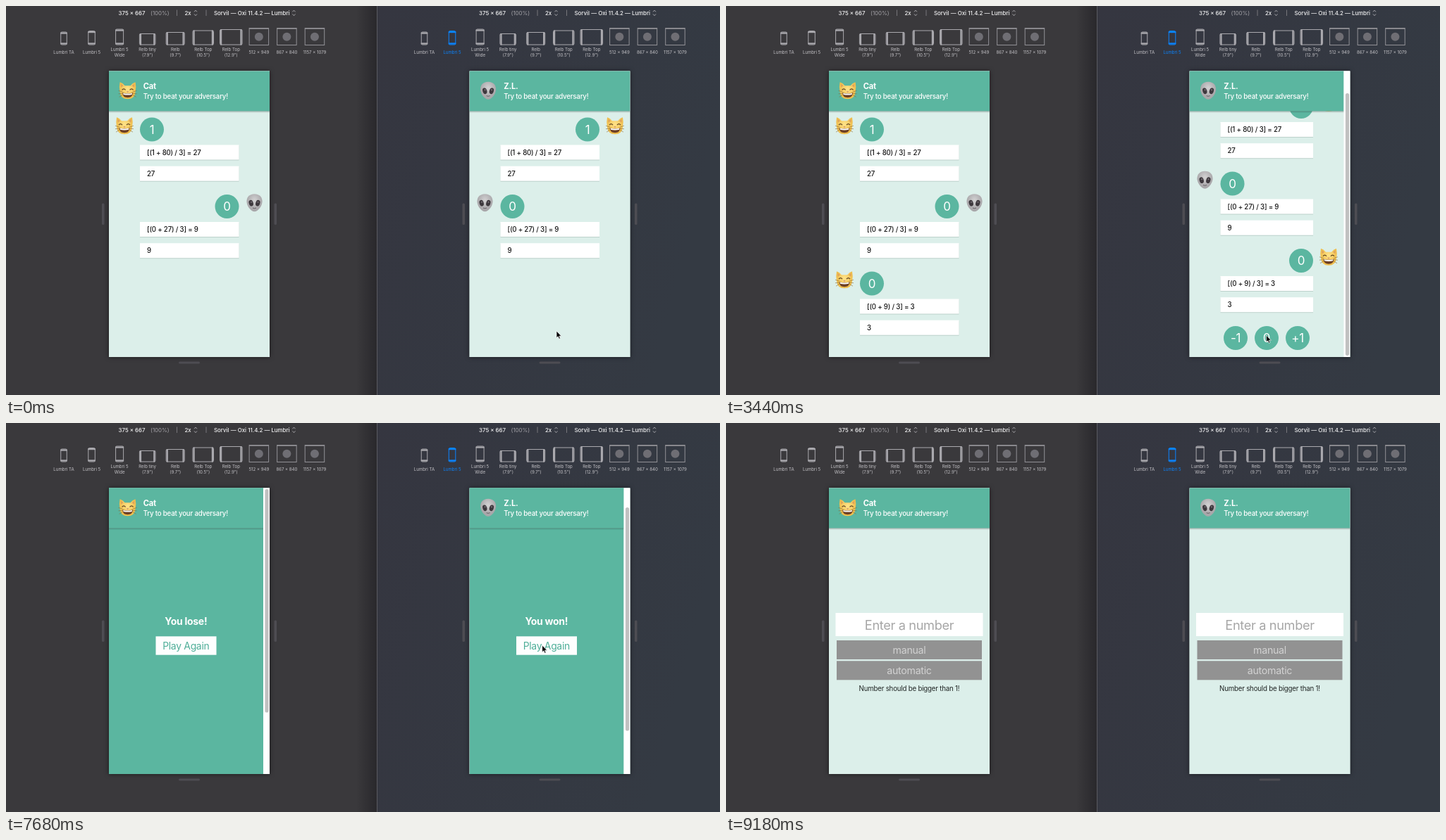
Animation of 1013 by 553 pixels, one loop 9630 ms. Source, as an HTML page:

```html
<!DOCTYPE html>
<html lang="en">
<head>
<meta charset="utf-8">
<title>Turn game on two phones</title>
<style>
html, body { margin: 0; width: 100%; height: 100%; overflow: hidden; background: #3a393c; }
#stage { display: block; width: 1013px; height: 553px; }
text { font-family: Inter, "Open Sans", sans-serif; white-space: pre; }
.app text { letter-spacing: -.02em; }
.frame { filter: drop-shadow(0 0 3px rgba(0, 0, 0, .55)); }
</style>
</head>
<body>
<svg id="stage" viewBox="0 0 1013 553" xmlns="http://www.w3.org/2000/svg">
  <defs>
    <linearGradient id="edge"><stop offset="0" stop-color="#232226" stop-opacity="0"/><stop offset="1" stop-color="#232226" stop-opacity=".75"/></linearGradient>
    <linearGradient id="pane" x2="1" y2=".3"><stop offset="0" stop-color="#353640"/><stop offset="1" stop-color="#343a43"/></linearGradient>
    <radialGradient id="fur" cy=".4"><stop offset="0" stop-color="#ffe48a"/><stop offset="1" stop-color="#efbe4d"/></radialGradient>
    <radialGradient id="skin" cy=".35"><stop offset="0" stop-color="#d3d2d3"/><stop offset="1" stop-color="#a9a7aa"/></radialGradient>
    <g id="cat">
      <path d="M-11 -12 Q-7 -11 -4 -7 H4 Q7 -11 11 -12 Q12.5 -5 11 2 Q10 12 0 12 Q-10 12 -11 2 Q-12.500 -5 -11 -12Z" fill="url(#fur)"/>
      <path d="M-9.500 -9.500 L-9.500 -4.500 L-6 -7Z M9.500 -9.500 L9.500 -4.500 L6 -7Z" fill="#dfa25c"/>
      <path d="M-8 -1 Q-5.500 -4 -3 -1 M8 -1 Q5.500 -4 3 -1" fill="none" stroke="#5b4020" stroke-width="1.200"/>
      <path d="M-7.500 3 Q0 5 7.500 3 Q7 10 0 10 Q-7 10 -7.500 3Z" fill="#6d3f24"/>
      <path d="M-6.500 3.600 Q0 5 6.500 3.600 L6 5.600 Q0 6.800 -6 5.600Z" fill="#fff"/>
      <path d="M-1.500 1 H1.500 L0 2.800Z" fill="#c98274"/>
      <path d="M-7 2 L-13 0 M-7 4 L-13 4.500 M-7 6 L-12 9 M7 2 L13 0 M7 4 L13 4.500 M7 6 L12 9" stroke="#8b6a35" stroke-width=".6"/>
    </g>
    <g id="alien">
      <path d="M0 -12.500 C7.500 -12.500 11.500 -7.500 11 -1 C10.500 5 5 12.500 0 12.500 C-5 12.500 -10.500 5 -11 -1 C-11.500 -7.500 -7.500 -12.500 0 -12.500Z" fill="url(#skin)"/>
      <ellipse cx="-4.800" cy=".5" rx="3" ry="4.400" transform="rotate(-18 -4.800 .5)" fill="#3d383d"/>
      <ellipse cx="4.800" cy=".5" rx="3" ry="4.400" transform="rotate(18 4.800 .5)" fill="#3d383d"/>
      <circle cx="-4.500" cy="-1" r="1" fill="#817a80"/><circle cx="5" cy="-1" r="1" fill="#817a80"/>
      <path d="M-2.500 7.300 Q0 8.800 2.500 7.300" fill="none" stroke="#5b575b" stroke-width=".9"/>
    </g>
  </defs>
  <rect width="1013" height="553" fill="#3a393c"/>
  <rect x="497" width="30" height="553" fill="url(#edge)"/>
  <rect x="526" width="487" height="553" fill="url(#pane)"/>
  <rect x="526" width="1" height="553" fill="#5a5a60"/>
  <g id="chrome"></g>
  <g id="left" class="app"></g>
  <g id="right" class="app" transform="translate(511.5)"></g>
  <g id="pointer">
    <path d="M0 0 V9.800 L2.200 7.800 L3.700 11.300 L5.400 10.600 L3.900 7.200 H6.900Z" fill="#000" stroke="#fff" stroke-width=".7"/>
    <g id="denied" fill="#e4e6e5" stroke="#858887"><circle cx="5.500" cy="14.800" r="4.700"/><path d="M2.500 11.800 L8.500 17.800"/></g>
  </g>
</svg>
<script>
const LOOP = 9630, SHIFT = 511.5;
const GREEN = '#5bb6a0', MINT = '#dcefea';
const $ = id => document.getElementById(id);

const rect = (x, y, w, h, fill, extra = '') =>
  `<rect x="${x}" y="${y}" width="${w}" height="${h}" fill="${fill}" ${extra}/>`;
const text = (x, y, size, fill, str, extra = '') =>
  `<text x="${x}" y="${y}" font-size="${size}" fill="${fill}" ${extra}>${str}</text>`;
const mid = (x, y, size, fill, str, extra = '') =>
  text(x, y, size, fill, str, 'text-anchor="middle" ' + extra);
const icon = (name, x, y) => `<use href="#${name}" x="${x}" y="${y}"/>`;

// Toolbar: width, top, kind, label lines
const devices = [
  [9.5, 36.5, 'phone', 'Lumbri TA'],
  [10.5, 35, 'phone', 'Lumbri 5'],
  [12, 32.5, 'phone', 'Lumbri 5', 'Wide'],
  [23.5, 39, 'tablet', 'Relb tiny', '(7.9")'],
  [27, 37, 'tablet', 'Relb', '(9.7")'],
  [30.5, 34.5, 'tablet', 'Relb Top', '(10.5")'],
  [32.5, 33, 'tablet', 'Relb Top', '(12.9")'],
  [27.5, 31.5, 'window', '512 × 949'],
  [27.5, 31.5, 'window', '867 × 840'],
  [27.5, 31.5, 'window', '1157 × 1079']
];

function device([w, top, kind, ...lines], i, active) {
  const cx = 82 + i * 39.55, x = cx - w / 2, h = 55.5 - top;
  const tone = active ? '#0a84ff' : '#aaa9ae';
  const line = `stroke="${tone}" rx="1.5"`;
  let out = '';
  if (kind === 'window') {
    out += rect(x, top, w, h, 'none', 'stroke="#929196"') + rect(x, top, w, 1.3, '#929196') +
      `<circle cx="${cx}" cy="43.7" r="6" fill="#6f6e74"/>`;
  } else {
    out += rect(x + .5, top + .5, w - 1, h - 1, 'none', line);
    out += kind === 'phone'
      ? rect(x, top + 1, w, 2.2, tone) + rect(x, 52.3, w, 2.2, tone)
      : rect(x + 1, top, 2.2, h, tone) + rect(x + w - 3.2, top, 2.2, h, tone);
  }
  const base = lines.length > 1 ? 64.2 : 68.2;
  return out + lines.map((s, n) => mid(cx, base + n * 8, 6.1, active ? tone : '#c4c3c7', s)).join('');
}

function chrome(active) {
  const arrows = x => `<path d="M${x - 2} 8.300 l2 -2.200 l2 2.200 M${x - 2} 11.500 l2 2.200 l2 -2.200" fill="none" stroke="#b5b4b8" stroke-width=".9"/>`;
  const label = (x, s) => text(x, 12.8, 7.9, '#f2f2f3', s, 'font-weight="500"');
  const grip = (x, y, w, h) => rect(x, y, w, h, '#4e4d53', 'rx="1.5"');
  return label(159.5, '375 × 667') + text(205, 12.8, 7.9, '#a3a2a7', '(100%)') +
    rect(242, 5.5, 1, 8.5, '#77767b') + label(253.5, '2x') + arrows(269) +
    rect(283.5, 5.5, 1, 8.5, '#77767b') + label(295, 'Sorvil — Oxi 11.4.2 — Lumbri') + arrows(408.5) +
    devices.map((d, i) => device(d, i, i === active)).join('') +
    grip(136, 280.5, 3.5, 30.5) + grip(380.5, 280.5, 3.5, 30.5) + grip(245, 505.5, 30, 3) +
    rect(146, 92.5, 228, 406.5, MINT, 'class="frame"');
}

// One turn: avatar, choice, sum and result
function turn({ who, pick, sum, result }, i, onRight, w) {
  const y = 175.5 + i * 109.5, end = 102.5 + w;
  const cx = onRight ? end - 17 : 207;
  const card = (top, s) => rect(190, top + 1, end - 190, 21, '#bdd2cc') +
    rect(190, top, end - 190, 21, '#fff') + text(200, top + 14, 9.7, '#151515', s, 'font-weight="500"');
  return icon(who, onRight ? cx + 39 : 168, y - 5.3) + button(cx, y, pick) +
    card(y + 22, sum) + card(y + 52.2, result);
}

const button = (x, y, s) => `<circle cx="${x}" cy="${y}" r="17" fill="${GREEN}"/>` + mid(x, y + 6.1, 17, '#fff', s);

const turns = [
  { who: 'cat', pick: 1, sum: '[(1 + 80) / 3] = 27', result: 27 },
  { who: 'alien', pick: 0, sum: '[(0 + 27) / 3] = 9', result: 9 },
  { who: 'cat', pick: 0, sum: '[(0 + 9) / 3] = 3', result: 3 }
];

function chat(s, w) {
  const rows = turns.slice(0, s.count).map((r, i) => turn(r, i, r.who !== s.near, w)).join('');
  const c = 146 + w / 2;
  const keys = s.keys ? ['-1', '0', '+1'].map((k, i) => button(c + (i - 1) * 44, 504.5, k)).join('') : '';
  return `<g transform="translate(0 ${-s.scroll})">${rows}${keys}</g>`;
}

const ending = s => rect(146, 92, 219, 408, GREEN) +
  mid(255.3, 286.6, 14, '#fff', s.verdict, 'font-weight="700"') +
  rect(212.5, 303.3, 86, 26.4, '#fdfefe') + mid(255.3, 322, 13.9, '#4eae98', 'Play Again');

const form = () => rect(155.5, 270, 209, 33, '#fff') + mid(260, 293.8, 18.2, '#a6a6a6', 'Enter a number') +
  rect(157, 309, 206, 27, '#929292') + mid(260, 328, 14.2, '#d2d2d2', 'manual') +
  rect(157, 338.3, 206, 27, '#929292') + mid(260, 357.3, 14.2, '#d2d2d2', 'automatic') +
  mid(260, 380.5, 9.7, '#202524', 'Number should be bigger than 1!');

const views = { chat, ending, form, blank: () => '' };

function phone(s) {
  const w = s.bar ? 219 : 228;
  const head = rect(146, 149.5, w, 2, '#000', 'opacity=".1"') + rect(146, 149.2, w, 1, '#555', 'opacity=".4"') +
    rect(146, 92, w, 57.4, GREEN) + icon(s.self, 172.6, 120.3) +
    text(194.7, 118, 11.2, '#fff', s.self === 'cat' ? 'Cat' : 'Z.L.', 'font-weight="700"') +
    text(194.7, 132.2, 9.7, '#fff', 'Try to beat your adversary!', 'font-weight="500"');
  const bar = s.bar ? rect(365, 92, 9, 408, '#fff') +
    rect(367.4, s.bar[0], 5.2, s.bar[1], '#c1c1c1', 'rx="2.6"') : '';
  return `<svg x="146" y="92.5" width="228" height="406.5" viewBox="146 92.5 228 406.5">` +
    rect(146, 92, 228, 408, MINT) + views[s.view](s, w) + head + bar + '</svg>';
}

function scene(t) {
  const left = { self: 'cat', near: 'cat' }, right = { self: 'alien', near: 'alien' };
  if (t < 3590) {
    const third = t >= 450;
    const scroll = t < 1520 ? 0 : t < 1670 ? 18 : 32.5;
    Object.assign(left, { view: 'chat', count: third ? 3 : 2, scroll: 0 });
    Object.assign(right, { view: 'chat', count: left.count, scroll, keys: third,
      bar: third && [94 + scroll * .92, 373] });
  } else if (t < 7900) {
    Object.assign(left, { view: 'ending', verdict: 'You lose!', bar: [94, 317.5] });
    Object.assign(right, { view: 'ending', verdict: 'You won!', bar: [120, 317.5] });
  } else {
    left.view = right.view = t > 8100 && t < 8250 ? 'blank' : 'form';
    if (left.view === 'blank') left.self = 'alien';
  }
  return [left, right];
}

const bursts = [[150, 1070, 7], [1220, 1220, 1], [1520, 1670, 2], [2420, 3440, 8], [3590, 4210, 5],
  [4510, 5140, 5], [6490, 7230, 6], [7680, 8590, 7], [8730, 9180, 4]];

function snap(t) {
  let last = 0;
  for (const [a, b, n] of bursts)
    for (let i = 0; i < n; i++) {
      const at = n > 1 ? a + (b - a) * i / (n - 1) : a;
      if (at <= t) last = at;
    }
  return last;
}

// Pointer path: time, x, y
const path = [[0, 781, 462], [1070, 779.3, 444], [1220, 779.5, 443], [2420, 779.5, 443],
  [3000, 768, 463], [3440, 766.5, 468], [3590, 770.7, 467.7], [4210, 780.5, 454.5], [4360, 780.5, 454.5],
  [4980, 974, 546], [6490, 901, 458], [7080, 766, 322], [7230, 757.5, 316], [7680, 760.7, 316],
  [7830, 768, 318], [8140, 834, 349], [8590, 922, 448], [9030, 978, 540], [LOOP, 978, 540]];

function pointerAt(t) {
  const i = path.findIndex(p => p[0] > t);
  const [a, x, y] = path[i - 1], [b, u, v] = path[i];
  const k = (t - a) / (b - a);
  return [x + (u - x) * k, y + (v - y) * k];
}

let shown = -1;
function draw(t) {
  const at = snap(t);
  if (at === shown) return;
  shown = at;
  const [left, right] = scene(at);
  $('left').innerHTML = phone(left);
  $('right').innerHTML = phone(right);
  const away = (at >= 5140 && at < 6490) || at >= 9180;
  $('pointer').setAttribute('visibility', away ? 'hidden' : 'visible');
  $('pointer').setAttribute('transform', `translate(${pointerAt(at)})`);
  $('denied').setAttribute('display', at > 7900 && at < 8250 ? 'inline' : 'none');
}

$('chrome').innerHTML = chrome(-1) + `<g transform="translate(${SHIFT})">${chrome(1)}</g>`;
const start = performance.now();
function tick() {
  draw((performance.now() - start) % LOOP);
  requestAnimationFrame(tick);
}
tick();
</script>
</body>
</html>
```
